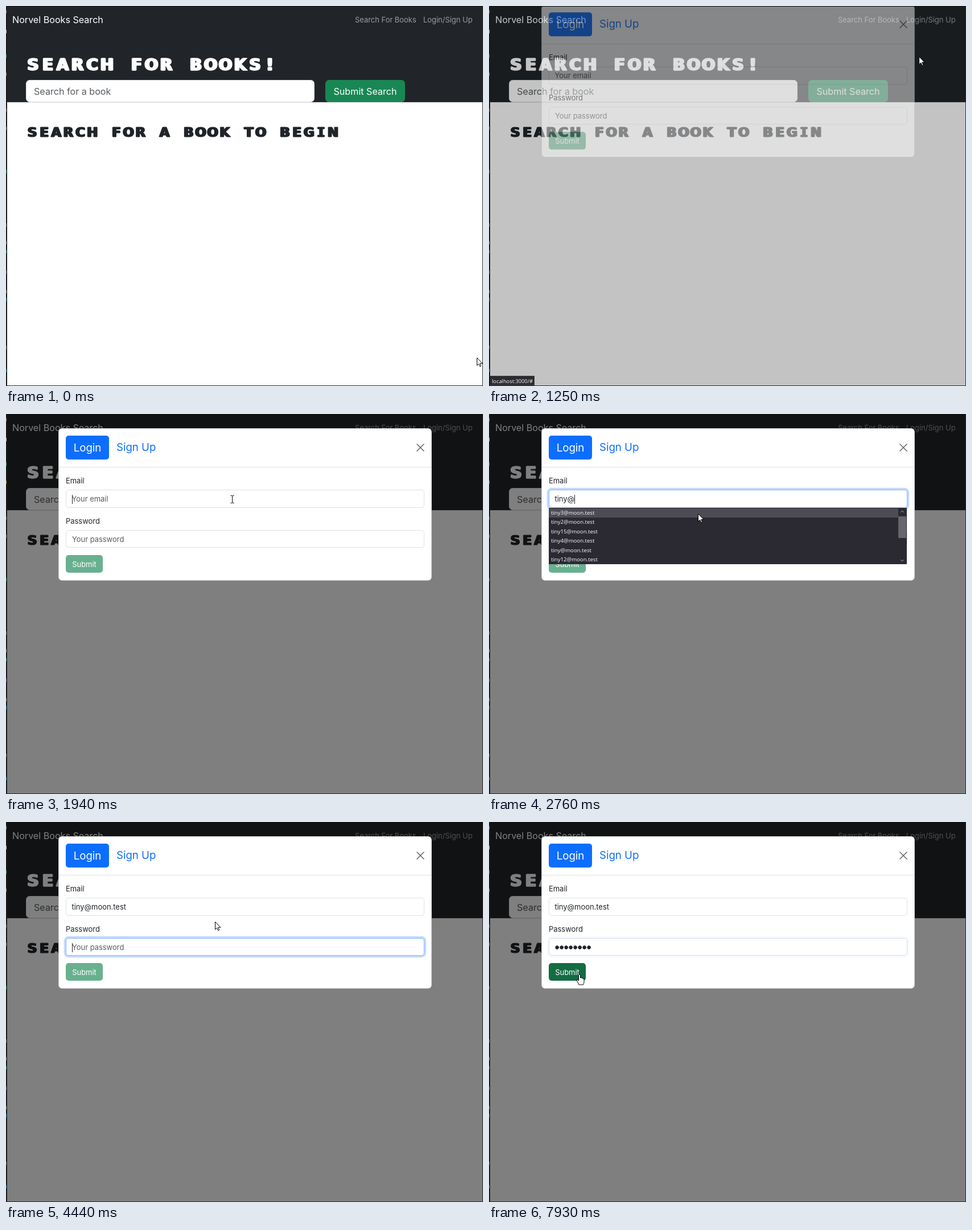
These frames come from a looping animation (838x668 px, 8000 ms). An HTML page:

```html
<!DOCTYPE html>
<html lang="en">
<head>
<meta charset="utf-8">
<title>Book search login</title>
<style>
html, body { margin: 0; width: 100%; height: 100%; overflow: hidden; background: #fff; }
body { position: relative; font: 13px Inter, sans-serif; letter-spacing: -.003em; color: #212529; }
div, h1, h2, svg { position: absolute; box-sizing: border-box; }
.layer { inset: 0; }
.t, h1, h2 { line-height: 20px; white-space: pre; margin: 0; }
.lg { font-size: 16.2px; }
.btn { display: flex; align-items: center; justify-content: center; border-radius: 5px; color: #fff; background: #198754; }
.field { background: #fff; border: 1px solid #dee2e6; border-radius: 5px; }
.ring { inset: -1px; border: 1px solid #86b7fe; border-radius: 5px; box-shadow: 0 0 0 3.3px #0d6efd40; }
.hint { color: #585c5f; }
h1, h2 { font-family: "DejaVu Sans", sans-serif; font-weight: bold; letter-spacing: 0; }
h1 { font-size: 28px; color: #fff; -webkit-text-stroke: 1.6px; text-shadow: 1.7px 0, -1.7px 0; }
h2 { font-size: 23px; -webkit-text-stroke: 1.2px; text-shadow: 1.4px 0, -1.4px 0; }
h1 i, h2 i { display: inline-block; font-style: normal; text-align: center; }
h1 i { width: 26px; }
h2 i { width: 21.15px; }
.I { font-family: "DejaVu Sans Mono", monospace; }
.caret { display: inline-block; width: 1px; height: 16px; margin-right: -1px; vertical-align: middle; background: #212529; }
#dots { left: 116px; top: 216px; height: 9px; background: radial-gradient(circle at 3.6px 50%, #212529 2.9px, #21252900 3.6px) 0 0 / 8px 9px; }
#list { left: 105px; top: 165px; width: 629px; height: 99px; overflow: hidden; background: #2b2a33; color: #fbfbfe; }
#list, #status { font-family: "Open Sans", sans-serif; font-size: 9.6px; letter-spacing: 0; }
#list .t { left: 0; width: 614px; padding-left: 4px; line-height: 16.4px; }
#list .t:first-child { background: #4d4c55; }
#status { left: 1px; top: 650px; width: 79px; height: 17px; padding-left: 4px; line-height: 18px; font-size: 9.3px; color: #fff; background: #2b2a2e; border: 1px solid #45444a; border-left: 0; }
</style>
</head>
<body>
<div style="left:0;top:0;width:838px;height:169px;background:#212529;box-shadow:0 1px #ddd"></div>
<div class="t lg" style="left:11px;top:14px;color:#fff">Norvel Books Search</div>
<div class="t" style="left:613px;top:14px;color:#9b9d9f">Search For Books</div>
<div class="t" id="link" style="left:733px;top:14px">Login/Sign Up</div>
<h1 style="left:34.5px;top:94px">SEARCH FOR BOOKS!</h1>
<div class="field" style="left:35px;top:130px;width:507px;height:39px;border-radius:6.5px"></div>
<div class="t lg hint" style="left:49px;top:140px">Search for a book</div>
<div class="btn lg" style="left:561px;top:130px;width:140px;height:39px;border-radius:6.5px">Submit Search</div>
<h2 style="left:35.5px;top:212px">SEARCH FOR A BOOK TO BEGIN</h2>

<div class="layer" id="shade" style="background:#000"></div>

<div class="layer" id="modal">
  <div style="left:92px;top:25px;width:656px;height:268px;background:#fff;border:1px solid #0003;border-radius:6.5px"></div>
  <div style="left:93px;top:93px;width:654px;height:1px;background:#dee2e6"></div>
  <div class="btn" style="left:105px;top:38px;width:76px;height:42px;font-size:18.7px;background:#0d6efd">Login</div>
  <div class="t" style="left:194px;top:49px;font-size:18.7px;color:#0d6efd">Sign Up</div>
  <svg style="left:721px;top:52px" width="14" height="14"><path d="M1 1L13 13M13 1L1 13" stroke="#666" stroke-width="1.5" stroke-linecap="round"/></svg>
  <div class="t" style="left:105px;top:107px">Email</div>
  <div class="field" style="left:105px;top:133px;width:630px;height:32px"><div class="ring" id="emailRing"></div></div>
  <div class="t" id="email" style="left:115.5px;top:139px"></div>
  <div class="t" style="left:105px;top:178px">Password</div>
  <div class="field" style="left:105px;top:204px;width:630px;height:31px"><div class="ring" id="passRing"></div></div>
  <div class="t" id="pass" style="left:116px;top:210px"></div>
  <div id="dots"></div>
  <div class="btn" id="submit" style="left:105px;top:248px;width:65px;height:31px">Submit</div>
  <div id="list"></div>
</div>

<div id="status">localhost:3000/#</div>
<div style="left:0;top:0;width:838px;height:668px;border:1px solid #26282a;border-top-color:#0c0d0e"></div>
<div id="edge" style="left:0;top:0;width:2px;height:668px;background:#1c1c1f;overflow:hidden"></div>
<svg width="838" height="668" style="left:0;top:0"><path id="cursor" stroke="#000" stroke-linejoin="round"/></svg>

<script>
const $ = id => document.getElementById(id);
const clamp = v => Math.max(0, Math.min(1, v));
const ramp = (t, start, length = 150) => clamp((t - start) / length);
const show = (id, on) => $(id).style.display = on ? '' : 'none';
const count = (times, t) => times.filter(k => t >= k).length;

for (const h of document.querySelectorAll('h1, h2'))
  h.innerHTML = [...h.textContent].map(c => `<i class="${c}">${c}</i>`).join('');

const address = 'tiny@moon.test';
$('list').innerHTML = [3, 2, 15, 4, '', 12].map((n, i) =>
  `<div class="t" style="top:${1 + i * 16.4}px">${address.replace('@', n + '@')}</div>`).join('') +
  `<div style="left:614px;top:15px;width:14px;height:38px;background:#67666c"></div>
  <svg width="14" height="99" style="left:614px;top:0"><path d="M4 8L7 5 10 8M4 91L7 94 10 91" fill="none" stroke="#a0a0a6"/></svg>`;

// Slivers of the window behind the left edge
$('edge').innerHTML = [[10, '#888'], [45, '#ccc'], [88, '#3a9a6a'], [120, '#b08a50'], [183, '#777'],
  [215, '#777'], [291, '#2fa070'], [385, '#777'], [416, '#888'], [432, '#3a9a8a'], [468, '#85a'],
  [502, '#888'], [516, '#28b'], [600, '#777'], [641, '#28b']].map(([y, c]) =>
  `<div style="left:0;top:${y - 3}px;width:1px;height:6px;background:${c}"></div>`).join('');

const emailKeys = [2200, 2290, 2360, 2490, 2630, 3230, 3340, 3450, 3560, 3760, 3850, 3950, 4050, 4150];
const passKeys = [4710, 4850, 4990, 5190, 5400, 5650, 6010, 6080, 6150];

// Pointer stops: time, x, y
const path = [[0, 827, 618], [70, 827, 618], [830, 795, 33], [1180, 795, 33], [1320, 717, 142],
  [1870, 400, 150], [2200, 380, 150], [2630, 367, 175], [5190, 367, 175], [5450, 330, 152],
  [5940, 197, 256], [6680, 197, 256], [7100, 161, 260], [7450, 161, 260], [7590, 160, 265],
  [7790, 160, 265], [7860, 159, 268], [8000, 159, 268]];
const shapes = {
  arrow: 'M.5.5V14L3.6 11.1 5.7 15.8 7.7 14.9 5.7 10.3H10Z',
  beam: 'M-3-6.5H-1L0-6 1-6.5H3M0-6V6M-3 6.5H-1L0 6 1 6.5H3',
  hand: 'M-1.5 1.2Q-1.5 0 0 0T1.5 1.2V6L2 5.6Q3.6 5.4 3.9 6.4Q5.6 6 6 7.2Q8 7 8 9V13Q8 15 6.6 18H-1.2Q-2 15-5 11Q-5.6 9-4 9Q-3 9-1.5 11Z'
};

function pointer(t) {
  const i = path.findIndex(p => p[0] > t);
  const [a, b] = [path[i - 1], path[i]];
  const u = (t - a[0]) / (b[0] - a[0]), s = u * u * (3 - 2 * u);
  return [a[1] + (b[1] - a[1]) * s, a[2] + (b[2] - a[2]) * s];
}

function drawCursor(t, x, y, overSubmit) {
  const inField = t > 1250 && x > 105 && x < 735 && (y > 116 && y < 165 || y > 204 && y < 235);
  const kind = overSubmit || t < 1110 && y < 45 ? 'hand' : inField ? 'beam' : 'arrow';
  $('cursor').setAttribute('d', shapes[kind]);
  $('cursor').setAttribute('fill', kind === 'beam' ? 'none' : '#fff');
  $('cursor').setAttribute('transform', `translate(${x} ${y})`);
}

function fillField(id, text, hint, caret) {
  $(id).innerHTML = text + (caret ? '<span class="caret"></span>' : '') +
    (hint ? `<span class="hint">${hint}</span>` : '');
}

function draw(t) {
  const [x, y] = pointer(t);
  const overSubmit = t > 6500 && x < 170;
  drawCursor(t, x, y, overSubmit);
  $('link').style.color = t > 800 && t < 1250 ? '#d8d9da' : '#9b9d9f';
  show('status', t >= 910 && t < 1530);

  const fade = ramp(t, 1176, 160);
  const slide = 1 - (1 - ramp(t, 1176, 330)) ** 1.67;
  $('shade').style.opacity = fade / 2;
  $('modal').style.opacity = fade;
  $('modal').style.transform = `translateY(${41 * (slide - 1)}px)`;

  const typed = count(emailKeys, t), dots = count(passKeys, t) - (t >= 7520);
  fillField('email', address.slice(0, typed), typed ? '' : 'Your email',
    t >= 1940 && t < 4290 && !(t >= 3030 && t < 3230));
  fillField('pass', '', dots ? '' : 'Your password', t >= 4290 && t < 4710);
  $('dots').style.width = dots * 8 + 'px';
  show('list', t >= 2200 && t < 2830);
  $('emailRing').style.opacity = ramp(t, 1940) - ramp(t, 4290);
  $('passRing').style.opacity = ramp(t, 4290) - ramp(t, 7800);

  $('submit').style.opacity = .65 + .35 * ramp(t, 4710);
  $('submit').style.background = t >= 7790 ? '#146c43' : overSubmit ? '#157347' : '#198754';
}

function tick() {
  draw(performance.now() % 8000);
  requestAnimationFrame(tick);
}
tick();
</script>
</body>
</html>
```
